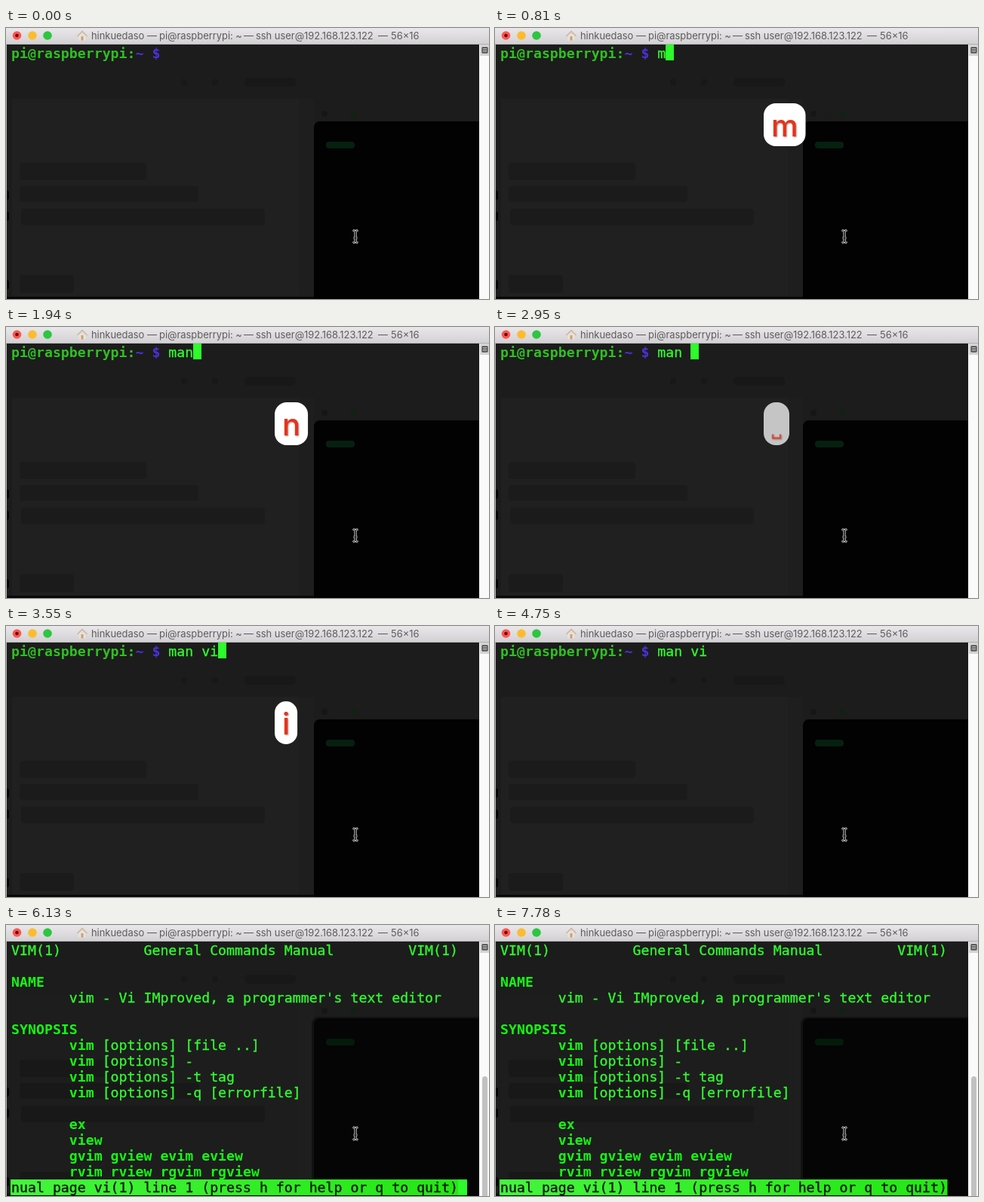
An HTML page with a canvas for the animation above (8000 ms loop, 640 by 360 pixels).

```html
<!DOCTYPE html>
<html lang="en">
<head>
<meta charset="utf-8">
<title>Terminal</title>
<style>
  html, body { margin: 0; width: 100%; height: 100%; overflow: hidden; background: #1c1c1c; }
  canvas { display: block; }
</style>
</head>
<body>
<canvas id="stage" width="640" height="360"></canvas>
<script>
const ctx = document.getElementById('stage').getContext('2d');
const LOOP = 8000, CELL = 10.96, ROW = 21, LEFT = 6.5, TOP = 22;
const MONO = '18.2px "DejaVu Sans Mono", monospace';
const GREEN = '#30fb2e', BRIGHT = '#14fa12', CURSOR = '#2dfb2b';

// [shown, starts fading, label]
const KEYS = [
  [750, 1170, 'm'], [1230, 1640, 'a'], [1880, 2360, 'n'], [2470, 2950, ' '],
  [3010, 3430, 'v'], [3490, 3910, 'i'], [4870, 5350, '\n'],
];
const COMMAND = 'man vi', ECHO_DELAY = 50, FADE = 60;
const CLEARED = 5050, PAGE = 6130;

// [row, column, text, bold]
const MANUAL = [
  [0, 0, 'VIM(1)'], [0, 16, 'General Commands Manual'], [0, 48, 'VIM(1)'],
  [2, 0, 'NAME', true],
  [3, 7, "vim - Vi IMproved, a programmer's text editor"],
  [5, 0, 'SYNOPSIS', true],
  ...['[options] [file ..]', '[options] -', '[options] -t tag', '[options] -q [errorfile]']
    .flatMap((text, i) => [[6 + i, 7, 'vim', true], [6 + i, 11, text]]),
  ...['ex', 'view', 'gvim gview evim eview', 'rvim rview rgvim rgview']
    .map((text, i) => [11 + i, 7, text, true]),
];
const STATUS = 'nual page vi(1) line 1 (press h for help or q to quit)';

function rect(x, y, w, h, color, radius = 0) {
  ctx.fillStyle = color;
  ctx.beginPath();
  ctx.roundRect(x, y, w, h, radius);
  ctx.fill();
}

function disc(x, y, r, color) {
  ctx.fillStyle = color;
  ctx.beginPath();
  ctx.arc(x, y, r, 0, 7);
  ctx.fill();
}

function line(points, color, width) {
  ctx.strokeStyle = color;
  ctx.lineWidth = width;
  ctx.beginPath();
  points.forEach(([x, y]) => ctx.lineTo(x, y));
  ctx.stroke();
}

// A hairline outline gives the regular weight its smoothed, heavier look.
function print(row, col, text, color, bold) {
  ctx.font = (bold ? 'bold ' : '') + MONO;
  ctx.fillStyle = ctx.strokeStyle = color;
  ctx.lineWidth = 0.35;
  [...text].forEach((c, i) => {
    const x = LEFT + 0.6 + (col + i) * CELL, y = TOP + row * ROW + 18;
    ctx.fillText(c, x, y);
    if (!bold) ctx.strokeText(c, x, y);
  });
}

function cursor(row, col) {
  rect(Math.round(LEFT + col * CELL), TOP + row * ROW, 11, ROW, CURSOR);
}

function backdrop(page) {
  rect(0, 0, 640, 360, '#1c1c1c');
  rect(8, 94, 380, 264, page ? '#1d1d1d' : '#202020');
  rect(388, 94, 20, 264, '#1e1e1e');
  const smudge = page ? '#181818' : '#1b1b1b';
  [[18, 179, 168, 23], [18, 210, 237, 21], [20, 240, 323, 22], [18, 328, 72, 24]]
    .forEach(([x, y, w, h]) => rect(x, y, w, h, smudge, 4));
  rect(316, 66, 68, 12, '#181818', 5);
  disc(236, 72, 4, '#181818');
  disc(277, 72, 4, '#181818');
  [422, 441, 460].forEach((x, i) => disc(x, 114, 4, ['#161616', '#1a1d1a', '#102214'][i]));
  rect(0, 357, 627, 3, '#080808');
  if (page) rect(405, 122, 230, 240, '#121212', 9);
  rect(408, 124, 230, 240, page ? '#050505' : '#020202', 8);
  rect(424, 151, 38, 9, page ? '#041a0a' : '#062010', 4);
  [216, 244, 335].forEach(y => rect(0, y, 4, 12, '#000', 2));
  rect(0, 22, 1, 338, '#b4b4b4');
}

function chrome(hasThumb) {
  const bar = ctx.createLinearGradient(0, 0, 0, 22);
  bar.addColorStop(0, '#e9e7e9');
  bar.addColorStop(1, '#d2d0d2');
  rect(0, 0, 640, 22, bar);
  rect(0, 21, 640, 1, '#b4b2b4');
  disc(14.5, 10, 5.8, '#fb5651');
  disc(14.5, 10, 2.3, '#6b0a08');
  disc(35, 10, 5.8, '#fcbb30');
  disc(55, 10, 5.8, '#2cc640');

  // home folder icon
  rect(96.5, 9, 9, 7.5, '#e9e2d8', 1);
  line([[94.5, 11], [101, 4.5], [107.5, 11]], '#cdb79c', 1.6);
  rect(99.5, 11, 3, 5.5, '#c9a078');

  ctx.font = '12.9px Inter, sans-serif';
  ctx.fillStyle = '#5d5c5d';
  [[113, 'hinkuedaso'], [187, '—'], [203, 'pi@raspberrypi: ~'], [315, '—'],
   [331, 'ssh user@192.168.123.122'], [493, '—'], [510, '56×16']]
    .forEach(([x, text]) => ctx.fillText(text, x, 15));

  rect(627, 22, 13, 338, '#fafafa');
  rect(628, 22, 12, 15, '#d4d4d4');
  rect(630.5, 25.5, 8, 8, '#333', 1);
  [27, 29, 31].forEach(y => rect(631.5, y, 6, 1, '#ddd'));
  if (hasThumb) rect(631, 201, 7, 170, '#c1c1c1', 3.5);
}

function pointer() {
  const beam = (color, width) => {
    line([[459.5, 268.5], [462, 269.5], [463, 271], [463, 283], [462, 284.5], [459.5, 285.5]], color, width);
    line([[466.5, 268.5], [464, 269.5], [463, 271], [463, 283], [464, 284.5], [466.5, 285.5]], color, width);
    line([[460.5, 279], [465.5, 279]], color, width);
  };
  beam('#ccc', 2.8);
  beam('#111', 1);
}

function badge(t) {
  const key = KEYS.find(([start, fade]) => t >= start && t < fade + FADE);
  if (!key) return;
  const [, fade, label] = key, red = '#ea3119';
  ctx.save();
  ctx.globalAlpha = t < fade ? 1 : 0.74;
  ctx.font = '500 40px Inter, sans-serif';
  const width = label === ' ' ? 34 : label === '\n' ? 52 : ctx.measureText(label).width + 20;
  rect(356, 100, width, 57, '#fff', 16);
  ctx.shadowColor = 'rgba(0,0,0,.4)';
  ctx.shadowBlur = 2;
  ctx.shadowOffsetX = ctx.shadowOffsetY = 1;
  if (label === ' ') {
    line([[368, 142.5], [368, 147.5], [378, 147.5], [378, 142.5]], red, 2.4);
  } else if (label === '\n') {
    line([[395, 118], [395, 134], [369, 134]], red, 3.5);
    line([[377, 126], [368, 134], [377, 142]], red, 3.5);
  } else {
    ctx.fillStyle = red;
    ctx.fillText(label, 366, 144);
  }
  ctx.restore();
}

function shell(t) {
  print(0, 0, 'pi@raspberrypi:', '#2fc022', true);
  print(0, 15, '~ $', '#4b31dc', true);
  const typed = KEYS.filter(([start]) => t >= start + ECHO_DELAY).length;
  print(0, 19, COMMAND.slice(0, typed), GREEN);
  if (t >= 300 && t < 4750) cursor(0, 19 + Math.min(typed, COMMAND.length));
  if (t >= 4870) cursor(1, 0);
}

function manual(t) {
  MANUAL.forEach(([row, col, text, bold]) => print(row, col, text, bold ? BRIGHT : GREEN, bold));
  const bar = ctx.createLinearGradient(6, 0, 600, 0);
  bar.addColorStop(0, '#44f53c');
  bar.addColorStop(1, '#24e614');
  rect(6, 338, 593.5, 21, bar);
  print(15, 0, STATUS, '#061806');
  if (t < 6790 || (t >= 7270 && t < 7780)) rect(599, 338, 12, 21, CURSOR);
}

function draw() {
  const t = performance.now() % LOOP;
  backdrop(t >= PAGE);
  if (t < CLEARED) shell(t);
  else if (t >= PAGE) manual(t);
  else if (t < 5770) cursor(0, 0);
  chrome(t >= CLEARED);
  pointer();
  badge(t);
  requestAnimationFrame(draw);
}
draw();
</script>
</body>
</html>
```
